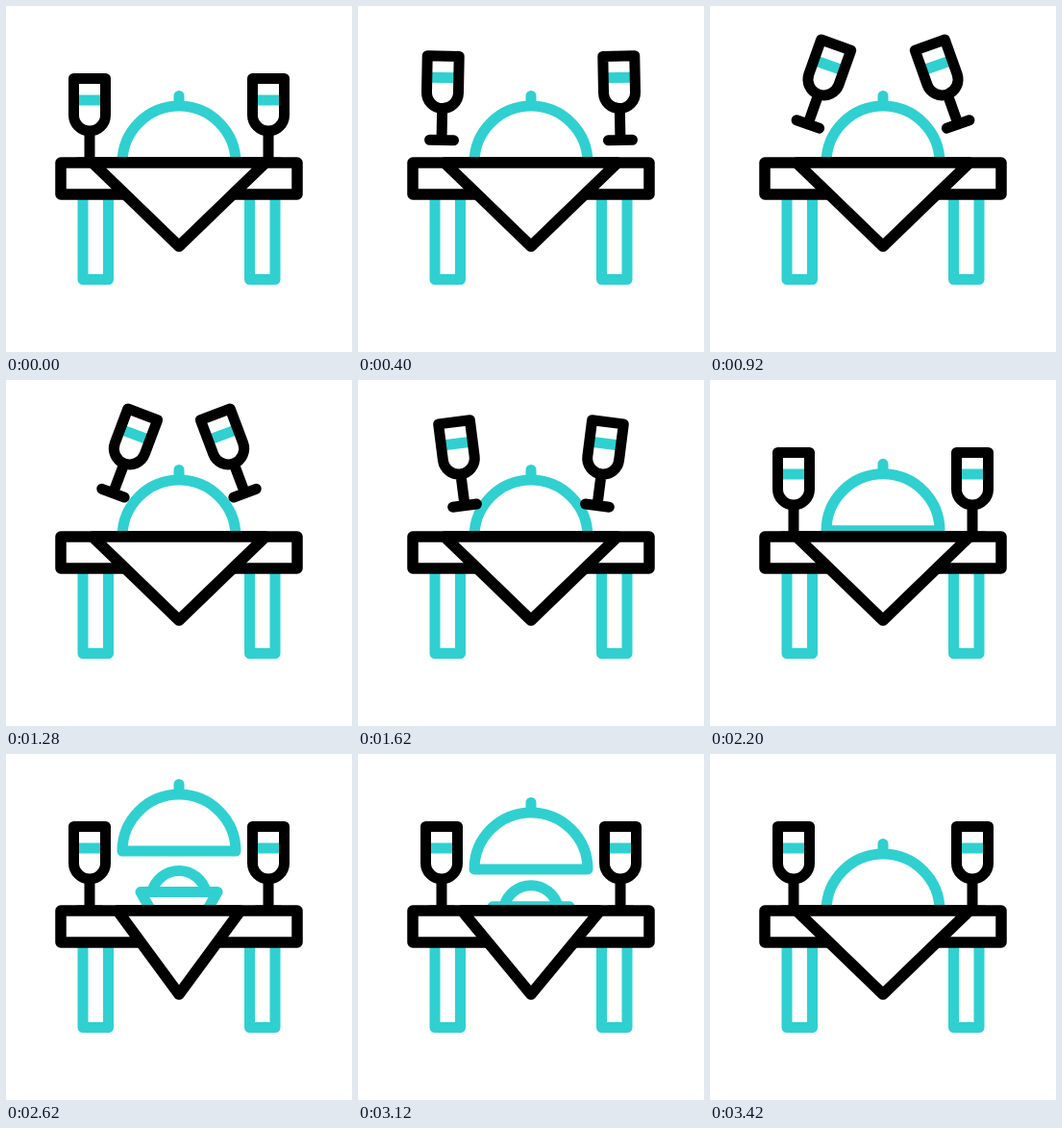
These frames come from a looping animation (360 px wide and 360 px high, 3600 ms). An HTML page:

```html
<!DOCTYPE html>
<html lang="en">
<head>
<meta charset="utf-8">
<title>Dinner for two</title>
<style>
  html, body { margin: 0; width: 100%; height: 100%; overflow: hidden; background: #fff; }
  svg { display: block; width: 100vw; height: 100vh; }
  g { fill: none; stroke-linecap: round; stroke-linejoin: round; stroke-width: 11; }
  .teal { stroke: #30d0d0; }
  .ink { stroke: #000; }
</style>
</head>
<body>
<svg viewBox="0 0 360 360">
  <defs>
    <clipPath id="above"><path d="M0 0H360V163H0z"/></clipPath>
    <g id="glass">
      <path class="teal" stroke-linecap="butt" d="M72 98H102"/>
      <path class="ink" d="M70.5 75.5H103.5V113.5A16.5 16.5 0 0 1 70.5 113.5zM87 130V163M74.5 163H99.5"/>
    </g>
  </defs>
  <g class="teal" clip-path="url(#above)">
    <path id="bowl" d="M140 143.5H220L209 163H151zM152 143.5A28.8 28.8 0 0 1 208 143.5"/>
    <path id="dome" d="M121 163A59 59 0 0 1 239 163zM180 104V93.5"/>
  </g>
  <g class="teal">
    <path d="M80 196V284.5H106.5V196M253.5 196V284.5H280V196"/>
  </g>
  <g id="left"><use href="#glass"/></g>
  <g transform="translate(360) scale(-1 1)"><g id="right"><use href="#glass"/></g></g>
  <g class="ink" style="stroke-width:11.5">
    <path fill="#fff" d="M57 163H303V196H57z"/>
    <path id="cloth" fill="#fff"/>
  </g>
</svg>
<script>
const LOOP = 3600;
const $ = id => document.getElementById(id);

// Linear interpolation through [time, value] keys, held at both ends
function track(t, ...keys) {
  let [t0, v0] = keys[0];
  for (const [t1, v1] of keys) {
    if (t < t1) return t <= t0 ? v0 : v0 + (v1 - v0) * (t - t0) / (t1 - t0);
    [t0, v0] = [t1, v1];
  }
  return v0;
}

function draw(t) {
  // Glasses lift, lean in to clink, rebound and settle
  const x = track(t, [385, 0], [1200, 45], [1915, 0]);
  const y = track(t, [110, 0], [385, -23], [1200, -45], [1915, -23], [2180, 0]);
  const tilt = track(t, [370, 0], [1200, 29.5], [1550, -9], [1915, 0]);
  const pose = `translate(${x} ${y}) rotate(${tilt} 87 119)`;
  $('left').setAttribute('transform', pose);
  $('right').setAttribute('transform', pose);

  // The dome lifts while the bowl rises and the cloth narrows
  const lift = track(t, [2155, 0], [2620, 1], [2990, 1], [3420, 0]);
  const gather = track(t, [2200, 0], [2620, 1], [2990, 1], [3420, 0]);
  $('dome').setAttribute('transform', `translate(0 ${-62 * lift})`);
  $('bowl').setAttribute('transform', `translate(0 ${50 * (1 - lift)})`);
  const half = 90 - 26 * gather;
  $('cloth').setAttribute('d', `M${180 - half} 163H${180 + half}L180 250z`);
}

const start = performance.now();
function frame() {
  draw((performance.now() - start) % LOOP);
  requestAnimationFrame(frame);
}
frame();
</script>
</body>
</html>
```
